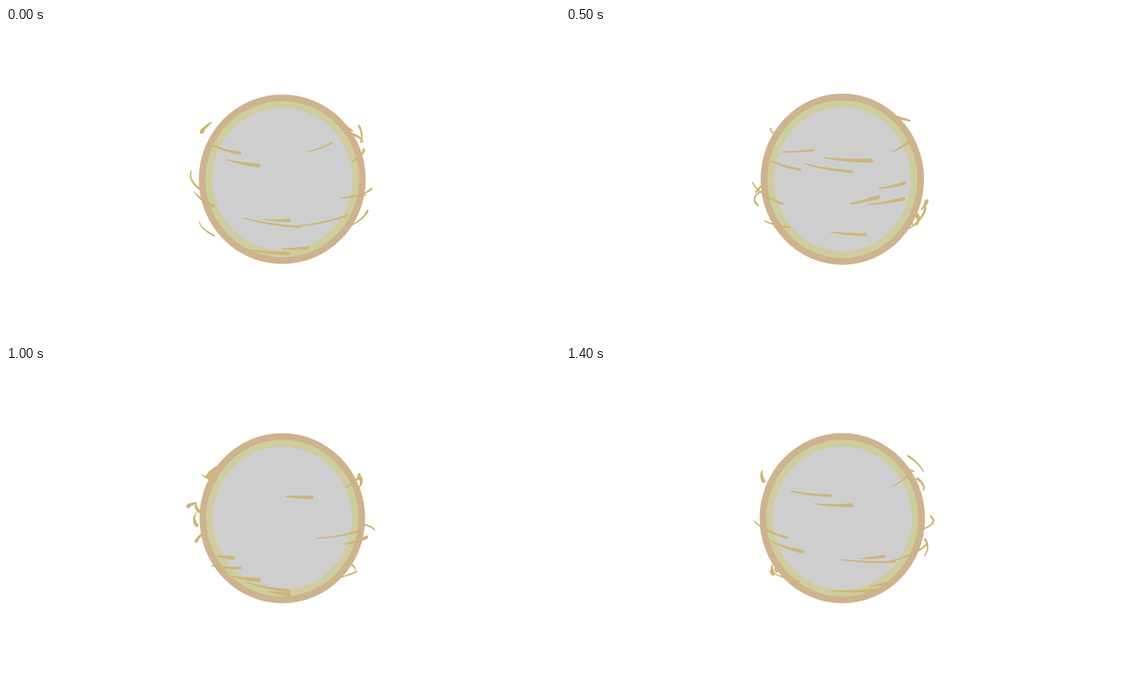
An HTML page with a canvas for the animation above (1500 ms loop, 800 by 450 pixels).

```html
<!DOCTYPE html>
<html lang="en">
<meta charset="utf-8">
<title>Spinning ball of straw</title>
<style>
  html, body { margin: 0; width: 100%; height: 100%; overflow: hidden; background: #fff; }
  canvas { display: block; }
</style>
<canvas id="stage" width="800" height="450"></canvas>
<script>
const ctx = document.getElementById('stage').getContext('2d');
const TAU = Math.PI * 2;
const LOOP = 1500, STEP = 100;
const CX = 399, CY = 218.8;
const PITCH = 0.3; // the ball is seen slightly from above
const STRAWS = 28, SEGMENTS = 14;
const GOLDEN_ANGLE = TAU * 0.381966;

let seed = 11;
function random(min, max) {
  seed = (seed * 16807) % 2147483647;
  return min + (max - min) * seed / 2147483647;
}

// Golden-angle spacing keeps the straws from clumping as they turn.
const straws = Array.from({ length: STRAWS }, (_, i) => ({
  lon: i * GOLDEN_ANGLE,
  lat: random(-0.65, 0.6),
  slope: random(-0.2, 0.2),
  span: random(0.25, 0.7),
  radius: random(123, 138),
  tip: random(0.8, 2),
  width: random(2, 6.5)
}));

function project(lon, lat, radius) {
  const depth = Math.cos(lat) * Math.cos(lon);
  const height = Math.sin(lat);
  return {
    x: CX + radius * Math.cos(lat) * Math.sin(lon),
    y: CY + radius * (depth * Math.sin(PITCH) - height * Math.cos(PITCH)),
    z: depth * Math.cos(PITCH) + height * Math.sin(PITCH)
  };
}

function drawStraw({ lon, lat, slope, span, radius, tip, width }, turn, front) {
  const at = t => project(lon - turn + span * t, lat + slope * span * t, radius);
  for (let i = 0; i < SEGMENTS; i++) {
    const from = at(i / SEGMENTS), to = at((i + 1) / SEGMENTS);
    if ((from.z > 0) !== front) continue;
    ctx.lineWidth = tip + (width - tip) * (i + 1) / SEGMENTS;
    ctx.beginPath();
    ctx.moveTo(from.x, from.y);
    ctx.lineTo(to.x, to.y);
    ctx.stroke();
  }
}

function disc(rx, ry, color) {
  ctx.fillStyle = color;
  ctx.beginPath();
  ctx.ellipse(CX, CY, rx, ry, 0, 0, TAU);
  ctx.fill();
}

function draw(now) {
  const progress = Math.floor(now % LOOP / STEP) * STEP / LOOP;
  const turn = progress * TAU;
  const squash = Math.cos(2 * turn - 0.7); // two squeezes per loop
  const rx = 119.4 + 1.5 * squash, ry = 123.2 - 0.7 * squash;
  const drawStraws = front => straws.forEach(straw => drawStraw(straw, turn, front));

  ctx.fillStyle = '#fff';
  ctx.fillRect(0, 0, 800, 450);
  ctx.strokeStyle = '#cdb679';
  ctx.lineCap = 'round';
  drawStraws(false);
  disc(rx, ry, '#ceb38f');
  disc(rx - 9.6, ry - 9.7, '#cecd9d');
  disc(rx - 19.2, ry - 19.5, '#cecece');
  drawStraws(true);
}

function tick() {
  draw(performance.now());
  requestAnimationFrame(tick);
}
tick();
</script>
</html>
```
